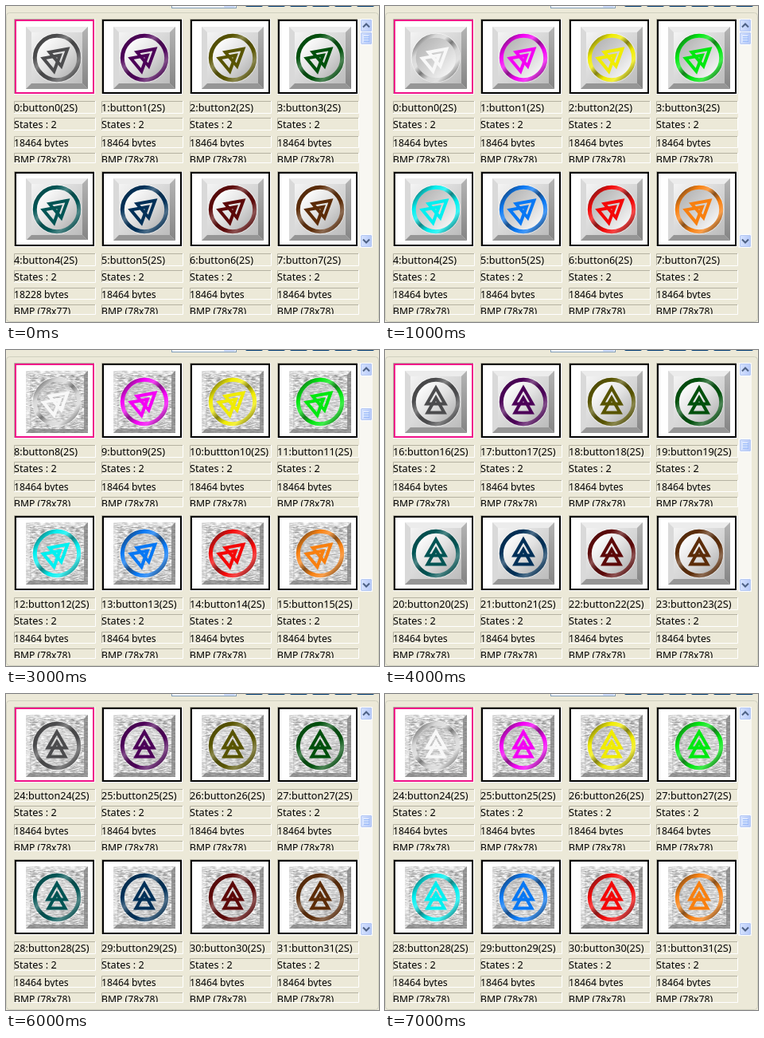
An HTML page that plays this animation: 469 px wide and 396 px high, repeating every 8 s.

```html
<!DOCTYPE html>
<html lang="en">
<head>
<meta charset="utf-8">
<title>Button gallery</title>
<style>
html, body { margin: 0; width: 100%; height: 100%; overflow: hidden; background: #ece9d8; }
svg { display: block; }
text { font-family: "Noto Sans", "DejaVu Sans", sans-serif; fill: #000; }
</style>
</head>
<body>
<svg id="stage" width="469" height="396" viewBox="0 0 469 396">
  <defs>
    <linearGradient id="face" x2="1" y2="1">
      <stop offset="0" stop-color="#f4f4f4"/><stop offset=".45" stop-color="#dadada"/>
      <stop offset="1" stop-color="#bcbcbc"/>
    </linearGradient>
    <linearGradient id="disc" x2="1" y2="1">
      <stop offset=".1" stop-color="#fff"/><stop offset=".5" stop-color="#e2e2e2"/>
      <stop offset=".9" stop-color="#b4b4b4"/>
    </linearGradient>
    <linearGradient id="discLit" x2="1" y2="1">
      <stop offset=".1" stop-color="#b4b4b4"/><stop offset=".5" stop-color="#d2d2d2"/>
      <stop offset=".9" stop-color="#f8f8f8"/>
    </linearGradient>
    <linearGradient id="edge" x2="0" y2="1">
      <stop offset="0" stop-color="#b4b4b4"/><stop offset="1" stop-color="#858585"/>
    </linearGradient>
    <linearGradient id="blue" x2="1">
      <stop offset="0" stop-color="#d8e4ff"/><stop offset="1" stop-color="#b4c8f8"/>
    </linearGradient>
    <filter id="brushed" x="0" y="0" width="1" height="1" color-interpolation-filters="sRGB">
      <feTurbulence type="fractalNoise" baseFrequency=".16 .65" numOctaves="3" seed="4"/>
      <feColorMatrix values=".8 0 0 0 .4  .8 0 0 0 .4  .8 0 0 0 .4  0 0 0 0 1"/>
    </filter>
    <g id="plain">
      <rect width="78" height="78" fill="#d9d9d9"/>
      <path d="M0 0H78L71 7H7Z" fill="#ececec"/>
      <path d="M78 0V78L71 71V7Z" fill="url(#edge)"/>
      <path d="M0 78H78L71 71H7Z" fill="#969696"/>
      <rect x="7" y="7" width="64" height="64" fill="url(#face)"/>
    </g>
    <g id="metal">
      <rect width="78" height="78" filter="url(#brushed)"/>
      <path d="M0 0H78L73 5H5V73L0 78Z" fill="#fff" opacity=".4"/>
      <path d="M78 0V78H0L5 73H73V5Z" fill="#777" opacity=".65"/>
    </g>
    <g id="arrows" fill="none" stroke-width="4">
      <path d="M0 -17.5L-11.5 2.5H11.5Z"/>
      <path d="M0 -5L-10.5 13.5H10.5Z"/>
    </g>
  </defs>
  <g id="chrome"></g>
  <g id="view"></g>
</svg>
<script>
const DARK = ['#4c4c4e', '#4c0058', '#585400', '#00500c', '#005454', '#003058', '#5c0808', '#5c2c08'];
const LIT = ['#f8f8f8', '#f400f4', '#f0ec00', '#00e810', '#00f0f0', '#0878f4', '#f40808', '#f88010'];
const COLS = [10, 120, 231, 341];
const ROWS = [16, 206.6];
const el = id => document.getElementById(id);

const rect = (x, y, w, h, fill, extra = '') =>
  `<rect x="${x}" y="${y}" width="${w}" height="${h}" fill="${fill}" ${extra}/>`;
const path = (d, stroke, width = 1) =>
  `<path d="${d}" fill="none" stroke="${stroke}" stroke-width="${width}"/>`;

// One-pixel inset edge: shadow at top left, light at bottom right.
const sunken = (x, y, w, h) =>
  path(`M${x + .5} ${y + h}V${y + .5}H${x + w}`, '#b5b2a2') +
  path(`M${x} ${y + h + .5}H${x + w + .5}V${y}`, '#fff');

function mix(hex, to, k) {
  const ch = [1, 3, 5].map(i => parseInt(hex.slice(i, i + 2), 16));
  return `rgb(${ch.map(c => Math.round(c + (to - c) * k)).join()})`;
}

function ringGradient(color, id, lit) {
  const shade = mix(color, 40, lit ? .55 : .2);
  const shine = mix(color, 255, lit ? .25 : .3);
  const stops = [[.02, shade], [.2, color], [.36, shine], [.5, shade], [.66, color], [.82, shine], [1, shade]];
  return `<linearGradient id="${id}" gradientUnits="userSpaceOnUse" x1="-24" y1="-24" x2="24" y2="24">` +
    stops.map(([o, c]) => `<stop offset="${o}" stop-color="${c}"/>`).join('') + '</linearGradient>';
}

function button(x, y, i, page, lit, height) {
  const metal = page % 2;
  const teal = page === 1 && !lit && i === 5;
  const n = teal ? 4 : i;
  const color = (lit ? LIT : DARK)[n];
  return `<svg x="${x}" y="${y}" width="78" height="${height}">
    <use href="#${metal ? 'metal' : 'plain'}"/>
    <g transform="translate(39 39)">
      <circle r="26" fill="url(#disc${lit ? 'Lit' : ''})" opacity="${metal ? .35 : 1}"/>
      <circle r="30.8" fill="none" stroke="#fff" opacity=".5"/>
      <circle r="27.7" fill="none" stroke="url(#${lit ? 'lit' : 'dark'}${n})" stroke-width="5"/>
      <use href="#arrows" stroke="${color}" transform="${page < 2 ? 'rotate(50)' : ''}"/>
    </g></svg>`;
}

// Inset text box that clips its text.
function label(x, top, h, size, str) {
  const y = Math.round(top);
  return sunken(x, y, 102, h) +
    `<svg x="${x}" y="${y}" width="102" height="${h}"><text y="13" font-size="${size}">${str}</text></svg>`;
}

function cell(i, page, lit) {
  const x = COLS[i % 4], row = ROWS[i >> 2], y = Math.round(row), id = page * 8 + i;
  const short = !lit && (id === 4 || id === 14);
  const name = (id === 10 ? 'buttton' : 'button') + id;
  return sunken(x, y, 101, 94) +
    rect(x + 2, y + 2, 98, 91, '#fff', `stroke="${i ? '#000' : '#f01088'}" stroke-width="2"`) +
    button(x + 15, Math.floor(row + 10), i, page, lit, short ? 77 : 78) +
    label(x, row + 103, 15, 12.7, `${id}:${name}(2S)`) +
    label(x, row + 124, 15, 12.7, 'States : 2') +
    label(x, row + 146.6, 14, 12.2, `${short ? 18228 : 18464} bytes`) +
    label(x, row + 167.6, 12, 12.2, `BMP (78x${short ? 77 : 78})`);
}

const knob = y => rect(445.5, y + .5, 15, 16, 'url(#blue)', 'rx="2" stroke="#fff"') +
  rect(446.5, y + 1.5, 13, 14, 'none', 'rx="1.5" stroke="#b5c8f2"');

function thumb(page) {
  const y = Math.floor(32.6 + page * 39.5);
  let lines = '';
  for (let k = 0; k < 4; k++) {
    lines += path(`M449 ${y + 5.5 + k * 2}h7`, '#eef4ff') + path(`M450 ${y + 6.5 + k * 2}h7`, '#8cb0f8');
  }
  return knob(y) + lines;
}

function drawChrome() {
  let out = '<defs>' + LIT.map((c, i) =>
    ringGradient(i ? c : '#d8d8d8', 'lit' + i, true) + ringGradient(DARK[i], 'dark' + i, false)).join('') + '</defs>';
  out += rect(0, 0, 469, 396, '#ece9d8') +
    rect(.5, 8.5, 468, 387, 'none', 'rx="4" stroke="#d0d0bf"') +
    rect(208.5, -10, 81, 12.5, '#fff', 'stroke="#7f9db9"') +
    rect(274, -8, 14, 9.5, '#c1d2fb', 'rx="1"');
  for (let k = 0; k < 6; k++) out += rect(301 + k * 28, -10, 22, 11, '#003c74', 'rx="2"');
  out += rect(444, 16, 17, 287, '#f8f7f2') + knob(16) + knob(286) +
    path('M449 26.5l4 -4l4 4M449 292.5l4 4l4 -4', '#4d6185', 2);
  el('chrome').innerHTML = out;
}

let shown = -1;
function tick(now) {
  const step = Math.floor(now % 8000 / 1000);
  if (step !== shown) {
    shown = step;
    const page = step >> 1, lit = step % 2 === 1;
    let out = thumb(page);
    for (let i = 0; i < 8; i++) out += cell(i, page, lit);
    el('view').innerHTML = out;
  }
  requestAnimationFrame(() => tick(performance.now() - start));
}

drawChrome();
const start = performance.now();
tick(0);
</script>
</body>
</html>
```
